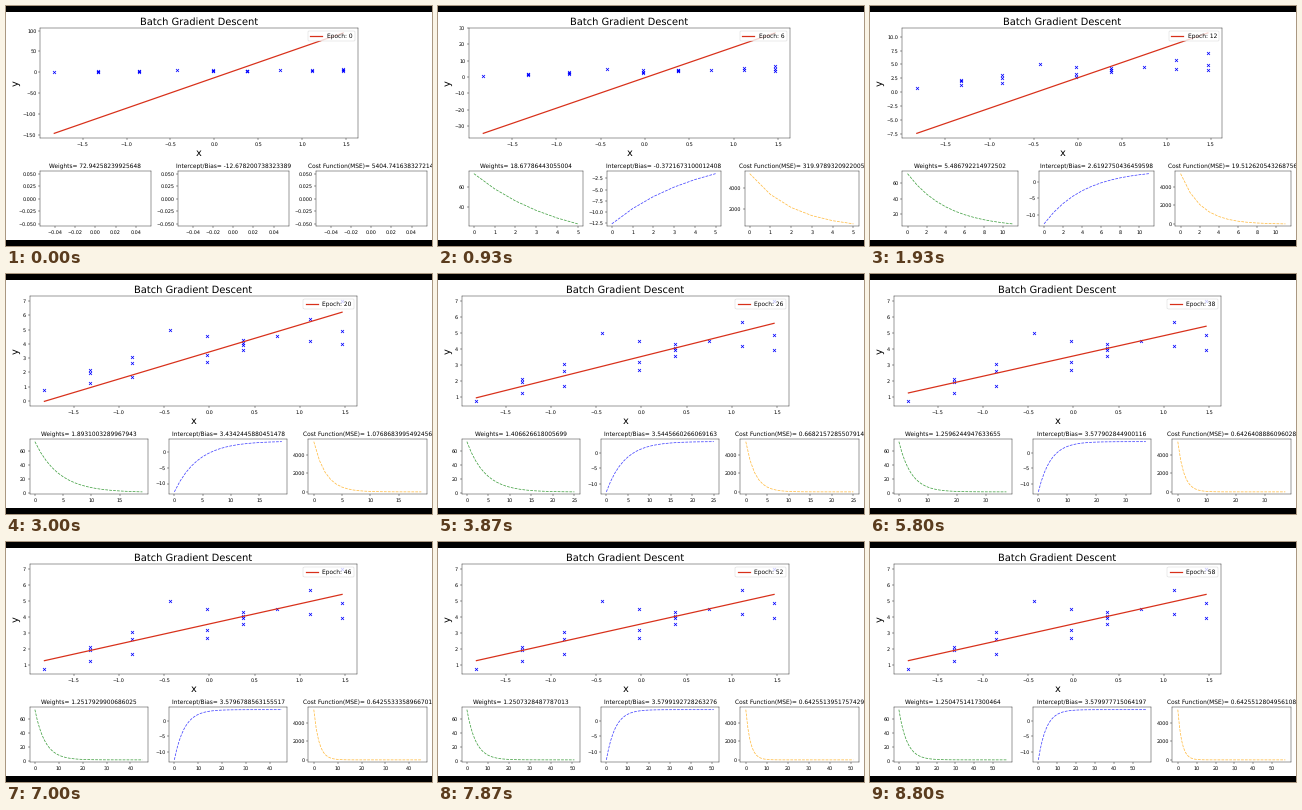
Write a matplotlib script that moves like this. It is 426 px wide and 240 px high and loops after 8870 ms.

```python
import matplotlib.pyplot as plt
import numpy as np
from matplotlib.animation import FuncAnimation
from matplotlib.patches import Rectangle

WIDTH, HEIGHT, DPI = 426, 240, 35.5
FRAMES, LOOP_MS = 133, 8870
BAR = 6 / HEIGHT
RATE, LAST = 0.79, 58

plt.rcParams["text.hinting"] = "none"

# Observed targets, grouped by feature level
groups = [[0.76], [1.28, 1.99, 2.17], [1.71, 2.63, 3.06], [4.99],
          [2.7, 3.22, 4.52], [3.58, 3.95, 4.07, 4.3], [4.53],
          [4.2, 5.71], [3.96, 4.88, 7]]
levels = np.repeat(np.arange(len(groups)), [len(g) for g in groups])
feature = (levels + 2) ** 0.74
xs = (feature - feature.mean()) / feature.std()
ys = np.concatenate(groups)

# Every step shrinks the distance to the optimum by the same factor
epochs = np.arange(LAST + 1)
decay = RATE ** epochs


def descend(first, last, ratio):
    share = (ratio - ratio[-1]) / (1 - ratio[-1])
    return last + (first - last) * share


weights = descend(72.94258239925648, 1.2504751417300464, decay)
biases = descend(-12.67820073832339, 3.579977715064197, decay)
costs = descend(5404.741638327214, 0.6425512804956108, decay ** 2)

fig = plt.figure(figsize=(WIDTH / DPI, (HEIGHT + 0.001) / DPI), dpi=DPI,
                 facecolor="white")
grid = fig.add_gridspec(2, 6, height_ratios=[2, 1])
main = fig.add_subplot(grid[0, :5])
panels = [
    (fig.add_subplot(grid[1, 2 * k:2 * k + 2]), *spec)
    for k, spec in enumerate([
        ("Weights", weights, "green"),
        ("Intercept/Bias", biases, "blue"),
        ("Cost Function(MSE)", costs, "orange"),
    ])
]
for bottom in (0, 1 - BAR):
    fig.add_artist(Rectangle((0, bottom), 1, BAR, color="black", lw=0,
                             transform=fig.transFigure, zorder=10))

shown = {"epoch": None}


def draw_fit(epoch):
    main.clear()
    main.scatter(xs, ys, marker="x", color="blue")
    main.plot(xs, weights[epoch] * xs + biases[epoch], color="#d8301a",
              lw=2.5, label=f"Epoch: {epoch}")
    main.set_title("Batch Gradient Descent", fontsize=20)
    main.set_xlabel("x", fontsize=20)
    main.set_ylabel("y", fontsize=20)
    main.legend(loc="upper right", fontsize=12)


def draw_history(ax, name, values, color, epoch):
    ax.clear()
    ax.plot(epochs[:epoch], values[:epoch], "--", color=color, alpha=0.75)
    ax.set_title(f"{name}= {values[epoch]}", fontsize=12)


def update(frame):
    # 20 epochs pass every 45 frames
    epoch = min((frame + 1) * 20 // 45, LAST)
    if epoch == shown["epoch"]:
        return
    shown["epoch"] = epoch
    fig.subplots_adjust(0.06, 0.08, 0.99, 0.91, 0.35, 0.4)
    draw_fit(epoch)
    for panel in panels:
        draw_history(*panel, epoch)
    fig.tight_layout(rect=(0, BAR, 1, 1 - BAR))


def reset():
    shown["epoch"] = None
    update(0)


anim = FuncAnimation(fig, update, frames=FRAMES, init_func=reset,
                     interval=LOOP_MS / FRAMES, repeat=True, repeat_delay=0,
                     blit=False)
plt.show()
```
